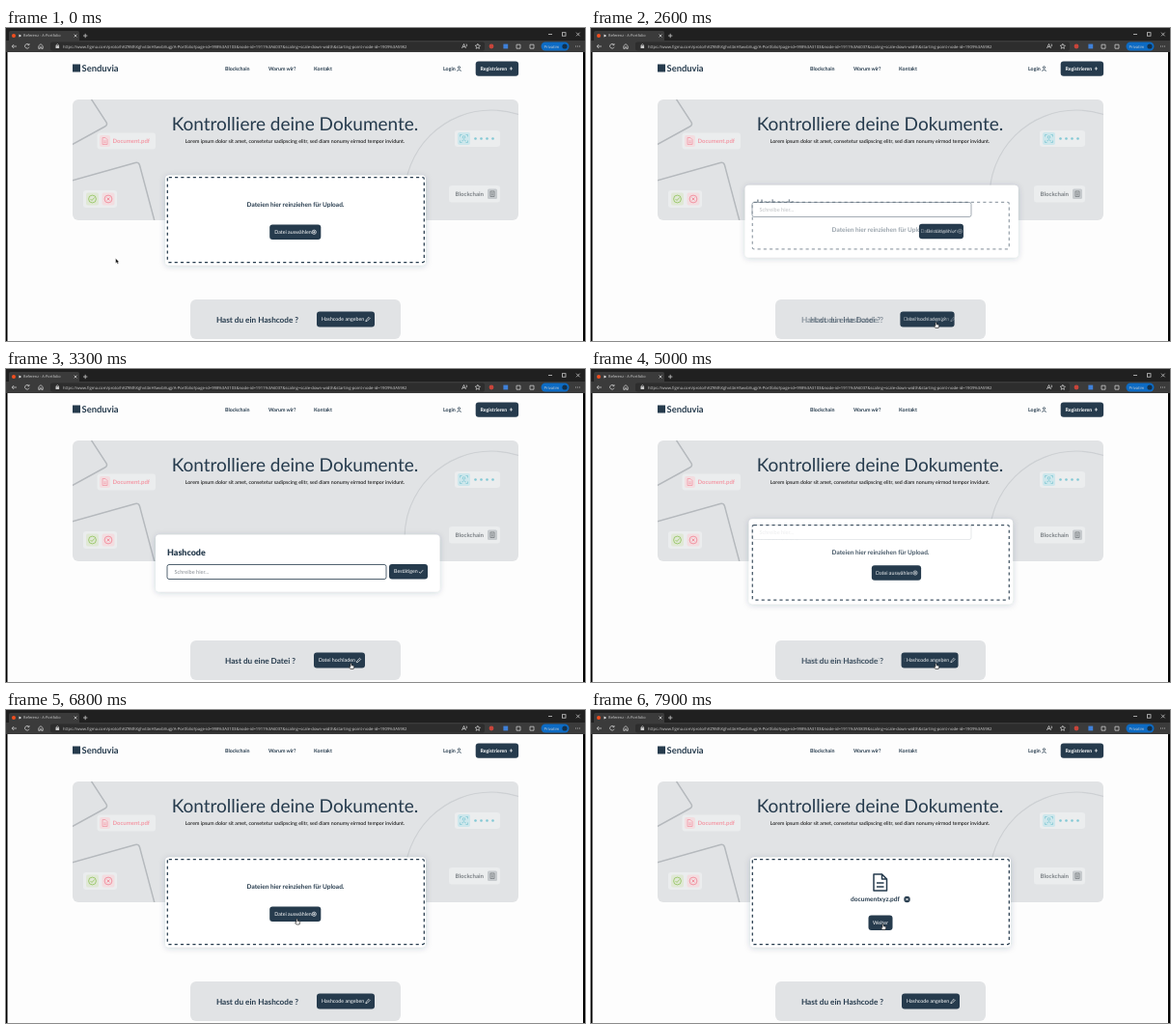
Write an HTML page that moves like this. It is 600 px wide and 324 px high and loops after 8000 ms.

```html
<!DOCTYPE html>
<html lang="de">
<head>
<meta charset="utf-8">
<title>Upload-Prototyp</title>
<style>
html, body { margin: 0; width: 100%; height: 100%; overflow: hidden; background: #000; }
svg { display: block; width: 600px; height: 324px; }
text { font-family: Lato, "Open Sans", sans-serif; fill: #263b4d; text-rendering: geometricPrecision; }
.b { font-weight: 700; }
.s { font-size: 5.3px; }
.w { fill: #fff; }
.dark { fill: #263b4d; }
.line { fill: none; stroke: #263b4d; stroke-width: .8; }
.wl { fill: none; stroke: #fff; stroke-width: .7; }
.ui text { font-family: "Open Sans", "Noto Sans", sans-serif; fill: #d0d0d0; }
.ui path, .ui .o { fill: none; stroke: #c9c9c9; stroke-width: .8; }
.chip { fill: #ebedee; }
.mid { text-anchor: middle; }
</style>
</head>
<body>
<svg viewBox="0 0 600 324">
  <defs>
    <filter id="shadow" x="-10%" y="-20%" width="120%" height="150%">
      <feDropShadow dx="0" dy="1" stdDeviation="3" flood-color="#263b4d" flood-opacity=".2"/>
    </filter>
    <clipPath id="heroClip"><rect x="69" y="74" width="462" height="125" rx="6"/></clipPath>
    <path id="pen" d="M.3 4.7L.7 3.2 3.5.4 4.6 1.5 1.8 4.3z" class="wl"/>
  </defs>

  <!-- browser -->
  <g class="ui">
    <rect width="600" height="14" fill="#202020"/>
    <path d="M3 14V5Q3 3 5 3H74Q76 3 76 5V14z" style="fill:#3b3b3b;stroke:none"/>
    <rect y="13" width="600" height="12" fill="#3b3b3b"/>
    <rect x="46" y="14.5" width="450" height="9" rx="2" fill="#2d2d2d"/>
    <circle cx="8" cy="8" r="2" fill="#f24e1e"/>
    <path d="M13.5 6.4l2.6 1.6-2.6 1.6z" style="fill:#eee;stroke:none"/>
    <text x="18" y="9.4" font-size="3.9">Referenz - A-Portfolio</text>
    <path d="M70.6 6.6l2.8 2.8m0-2.8l-2.8 2.8M80 8h4.4M82.2 5.8v4.4M562 6.5h4M591 4.7l3.6 3.6m0-3.6l-3.6 3.6"/>
    <rect class="o" x="576.5" y="4.7" width="3.5" height="3.5"/>
    <path d="M11 19H6.2m2-2l-2 2 2 2M23.8 17.5a2.3 2.3 0 1 0 .2 2.2M24 16v1.7h-1.7"/>
    <path d="M33.8 18.6l2.2-2 2.2 2v2.8h-1.4v-1.6h-1.6v1.6h-1.4z"/>
    <path d="M52.2 18.5v-1q1.1-1.6 2.2 0v1"/>
    <rect x="51.5" y="18.2" width="3.6" height="2.8" fill="#c9c9c9"/>
    <text id="url" x="59" y="20.5" font-size="4.2"></text>
    <path d="M472.5 21l2-4.5 2 4.5m-3.2-1.5h2.4M477 16.5q1.4 1.4 0 2.8M488.8 16.3l.8 1.7 1.8.2-1.3 1.3.3 1.8-1.6-.9-1.6.9.3-1.8-1.3-1.3 1.8-.2z"/>
    <circle cx="503" cy="19" r="2.4" fill="#c8443a"/>
    <rect x="515.4" y="16.6" width="4.8" height="4.8" fill="#3f80d8"/>
    <path d="M529 17.2h4v4h-4zM543 17.2h4v4h-4z"/>
    <rect x="554.5" y="14.5" width="29" height="9" rx="4.5" fill="#0d6bc4"/>
    <text x="557.5" y="20.5" font-size="4.1">Privatim</text>
    <circle cx="579" cy="19" r="2.6" fill="#14304a"/>
    <path d="M590 19h1m1 0h1m1 0h1"/>
  </g>
  <rect x="1.5" y="25" width="596.5" height="299" fill="#fdfdfd"/>

  <!-- navigation -->
  <rect class="dark" x="69" y="37.5" width="8" height="8"/>
  <text class="b" x="78.5" y="45" font-size="9.4">Senduvia</text>
  <g class="b" font-size="5.3">
    <text x="227" y="44">Blockchain</text>
    <text x="272" y="44">Warum wir?</text>
    <text x="319" y="44">Kontakt</text>
    <text x="453" y="44">Login</text>
  </g>
  <g stroke-width=".6">
    <circle class="line" cx="469.5" cy="40.8" r="1.1"/>
    <path class="line" d="M467.6 44.6v-.5q1.9-1.9 3.8 0v.5"/>
  </g>
  <rect class="dark" x="486.7" y="34.4" width="44.4" height="15.4" rx="3"/>
  <text class="b w" x="491.5" y="44" font-size="5.2">Registrieren</text>
  <path class="wl" d="M521.8 42h3.2M523.4 40.3v3.4"/>

  <!-- hero -->
  <g clip-path="url(#heroClip)">
    <rect x="69" y="74" width="462" height="125" fill="#e1e3e5"/>
    <g fill="none" stroke="#b5b9bd" stroke-width="1.5">
      <path d="M88 73L104 97.500Q105.500 100.500 102.500 102L68 121M68 158L134 139.500Q137.500 138.500 138.500 142L154 200"/>
      <circle cx="503" cy="175" r="90" stroke="#cdd0d3" stroke-width="1.2"/>
    </g>
  </g>
  <text class="mid" x="299.5" y="105.500" font-size="19">Kontrolliere deine Dokumente.</text>
  <text class="mid" x="299.5" y="118.500" font-size="5.300" font-weight="500" style="fill:#111">Lorem ipsum dolor sit amet, consetetur sadipscing elitr, sed diam nonumy eirmod tempor invidunt.</text>

  <rect class="chip" x="94.5" y="108.5" width="60.5" height="17" rx="3"/>
  <rect x="97" y="111" width="11" height="12" rx="2" fill="#f3dde0"/>
  <path d="M100 113.500h3l2 2v5h-5zM101.300 117h2.400m-2.400 1.700h2.400" fill="none" stroke="#f39aa7" stroke-width=".8"/>
  <text class="b" x="110.5" y="119" font-size="6" style="fill:#f39aa7">Document.pdf</text>

  <rect class="chip" x="80" y="168" width="35" height="18" rx="3"/>
  <rect x="83" y="170.5" width="13" height="13" rx="2" fill="#e0e8d6"/>
  <rect x="99.5" y="170.5" width="13" height="13" rx="2" fill="#f3dde0"/>
  <g fill="none" stroke-width=".9">
    <path d="M87.500 177l1.500 1.500 2.700-3M93.400 177a3.900 3.900 0 1 1-7.800 0a3.900 3.900 0 1 1 7.800 0" stroke="#98c766"/>
    <path d="M104.600 175.600l2.800 2.800m0-2.800l-2.800 2.800M109.900 177a3.900 3.900 0 1 1-7.800 0a3.900 3.900 0 1 1 7.800 0" stroke="#f28c9b"/>
  </g>

  <rect class="chip" x="465" y="106" width="47" height="17" rx="3"/>
  <rect x="468" y="108" width="13" height="13" rx="2" fill="#cde7ec"/>
  <g fill="none" stroke="#82c8d4" stroke-width=".8">
    <path d="M470.500 112.500v-2h2m4 0h2v2m0 4v2h-2m-4 0h-2v-2M472.300 117q2.200-2.600 4.400 0"/>
    <circle cx="474.5" cy="113" r="1.3"/>
  </g>
  <g fill="#82c8d4">
    <circle cx="486.5" cy="114.5" r="1.3"/><circle cx="492.5" cy="114.5" r="1.3"/>
    <circle cx="498.5" cy="114.5" r="1.3"/><circle cx="504.5" cy="114.5" r="1.3"/>
  </g>

  <rect class="chip" x="459" y="163" width="53" height="17.5" rx="3"/>
  <text class="b" x="465.5" y="173.8" font-size="6.1" style="fill:#7b8085">Blockchain</text>
  <rect x="499" y="166.5" width="10" height="10.5" rx="1.5" fill="#c6cacd"/>
  <path d="M502 169h4v5.500h-4zM503 171h2m-2 1.800h2" fill="none" stroke="#7b8085" stroke-width=".8"/>

  <!-- card -->
  <rect id="card" rx="4" fill="#fff" filter="url(#shadow)"/>
  <g id="upload">
    <rect id="dash" x="167.3" width="266" rx="1.5" class="line" stroke-dasharray="3.125" style="stroke-width:1.25"/>
    <text id="drop" class="b mid" x="300" font-size="6.5">Dateien hier reinziehen für Upload.</text>
  </g>
  <g id="doc">
    <path class="line" style="stroke-width:1.5;stroke-linejoin:round" d="M293 170h8.500l5 5v12H293zM301.500 170v5h5M296 179h7.500m-7.500 4h7.500"/>
    <text class="b" x="269" y="198" font-size="6.6">documentxyz.pdf</text>
    <circle class="dark" cx="327.5" cy="196" r="3.2"/>
    <path class="wl" style="stroke-width:.9" d="M326.300 194.800l2.400 2.400m0-2.400l-2.400 2.400"/>
  </g>
  <g id="hash">
    <text id="title" font-size="8.9" font-weight="900">Hashcode</text>
    <g id="field">
      <rect x="167" width="227" height="15" rx="2" class="line" style="fill:#fff"/>
      <text x="174.5" y="9.4" font-size="5.6" style="fill:#858b91">Schreibe hier...</text>
    </g>
  </g>
  <rect id="btn" class="dark" rx="3"/>
  <g id="pick"><text class="w s" x="-21.5" y="1.7">Datei auswählen</text>
    <circle class="wl" cx="19.5" r="2.1"/><path class="wl" d="M18.400 0h2.200M19.500-1.100v2.200"/></g>
  <g id="confirm"><text class="w s" x="-15" y="1.7">Bestätigen</text><path class="wl" d="M11 .2l1.400 1.400 2.800-3.200"/></g>
  <text id="next" class="w s mid" y="1.7">Weiter</text>

  <!-- switch -->
  <rect x="191" y="281" width="218" height="41" rx="6" fill="#e1e3e5"/>
  <g class="b" font-size="8.2">
    <text id="askHash" class="mid" x="260.5" y="304.5">Hast du ein Hashcode ?</text>
    <text id="askFile" class="mid" x="263.5" y="304.5">Hast du eine Datei ?</text>
  </g>
  <rect id="swap" class="dark" y="293.5" height="16" rx="3"/>
  <g id="toHash"><text class="w s" x="327" y="303.3">Hashcode angeben</text><use href="#pen" x="372.5" y="299"/></g>
  <g id="toFile"><text class="w s" x="324" y="303.3">Datei hochladen</text><use href="#pen" x="363" y="299"/></g>

  <path id="arrow" d="M0 0V5L1.200 4 2 5.800 2.900 5.400 2.100 3.700H3.600z" fill="#111" stroke="#fff" stroke-width=".3"/>
  <path id="hand" d="M-.6.500Q0-.4.600.5V2.200L2.800 2.800Q3.300 3 3.200 3.700L2.600 6H-.6L-2 3.900Q-1.500 3.200-.6 4z" fill="#fff" stroke="#111" stroke-width=".6"/>
</svg>
<script>
const $ = id => document.getElementById(id);
const set = (id, attrs) => { for (const k in attrs) $(id).setAttribute(k, attrs[k]); };
const fade = (id, opacity) => set(id, { opacity });
const mix = (a, b, p) => a + (b - a) * p;
const ease = (t, start) => 1 - (1 - Math.min(1, Math.max(0, (t - start) / 400))) ** 3;
const box = (id, x, y, right, bottom) => set(id, { x, y, width: right - x, height: bottom - y });

const url = node => 'https://www.figma.com/proto/hKZ9MhXghvt4nHSwvbVugj/A-Portfolio?page-id=998%3A3103&node-id=1911%3A'
  + node + '&scaling=scale-down-width&starting-point-node-id=1909%3A5982';

// time, x, y of the pointer tip
const path = [
  [0, 113.5, 238.5], [900, 245, 264], [1400, 354, 286], [1800, 357.5, 304.5],
  [5850, 357.5, 304.5], [6500, 301.5, 216], [7550, 301.5, 216], [7900, 302.5, 221.5], [8000, 302.5, 221.5]
];

function pointer(t) {
  const i = path.findIndex(k => k[0] > t);
  const [t0, x0, y0] = path[i - 1], [t1, x1, y1] = path[i];
  const p = (t - t0) / (t1 - t0);
  const x = mix(x0, x1, p), y = mix(y0, y1, p);
  const over = y > 293.5 && x > 320 || t > 6000 && y < 219 || t > 7000;
  for (const id of ['arrow', 'hand']) set(id, { transform: `translate(${x} ${y})` });
  fade('arrow', over ? 0 : 1);
  fade('hand', over ? 1 : 0);
}

function draw(t) {
  const p = ease(t, 2510) - ease(t, 4810);
  const q = ease(t, 6950);

  const left = mix(165, 155, p), top = mix(152.5, 171.5, p);
  box('card', left, top, mix(435, 449.5, p), mix(245.5, 230.5, p));
  const inner = mix(154.7, 202.5, p);
  set('dash', { y: inner, height: mix(242.7, 217, p) - inner });
  set('drop', { y: inner + 30.3, opacity: 1 - q });
  set('title', { x: left + 12, y: top + 21.5 });
  set('field', { transform: `translate(0 ${inner})` });
  fade('upload', 1 - p);
  fade('hash', p);
  fade('doc', q);

  const x0 = mix(mix(273.2, 397, p), 287.5, q), x1 = mix(mix(326.3, 437, p), 312.5, q);
  const y0 = mix(mix(203.5, 202, p), 212.5, q), y1 = mix(mix(219, 217.5, p), 228, q);
  box('btn', x0, y0, x1, y1);
  const parts = { pick: (1 - p) * (1 - q), confirm: p, next: q };
  for (const id in parts)
    set(id, { transform: `translate(${(x0 + x1) / 2} ${(y0 + y1) / 2})`, opacity: parts[id] });

  const s = mix(322, 319, p);
  set('swap', { x: s, width: mix(382, 372, p) - s });
  for (const id of ['askHash', 'toHash']) fade(id, 1 - p);
  for (const id of ['askFile', 'toFile']) fade(id, p);

  $('url').textContent = url(t < 7000 ? 6037 : 5839);
  pointer(t);
}

const start = performance.now();
function tick() {
  draw((performance.now() - start) % 8000);
  requestAnimationFrame(tick);
}
tick();
</script>
</body>
</html>
```
